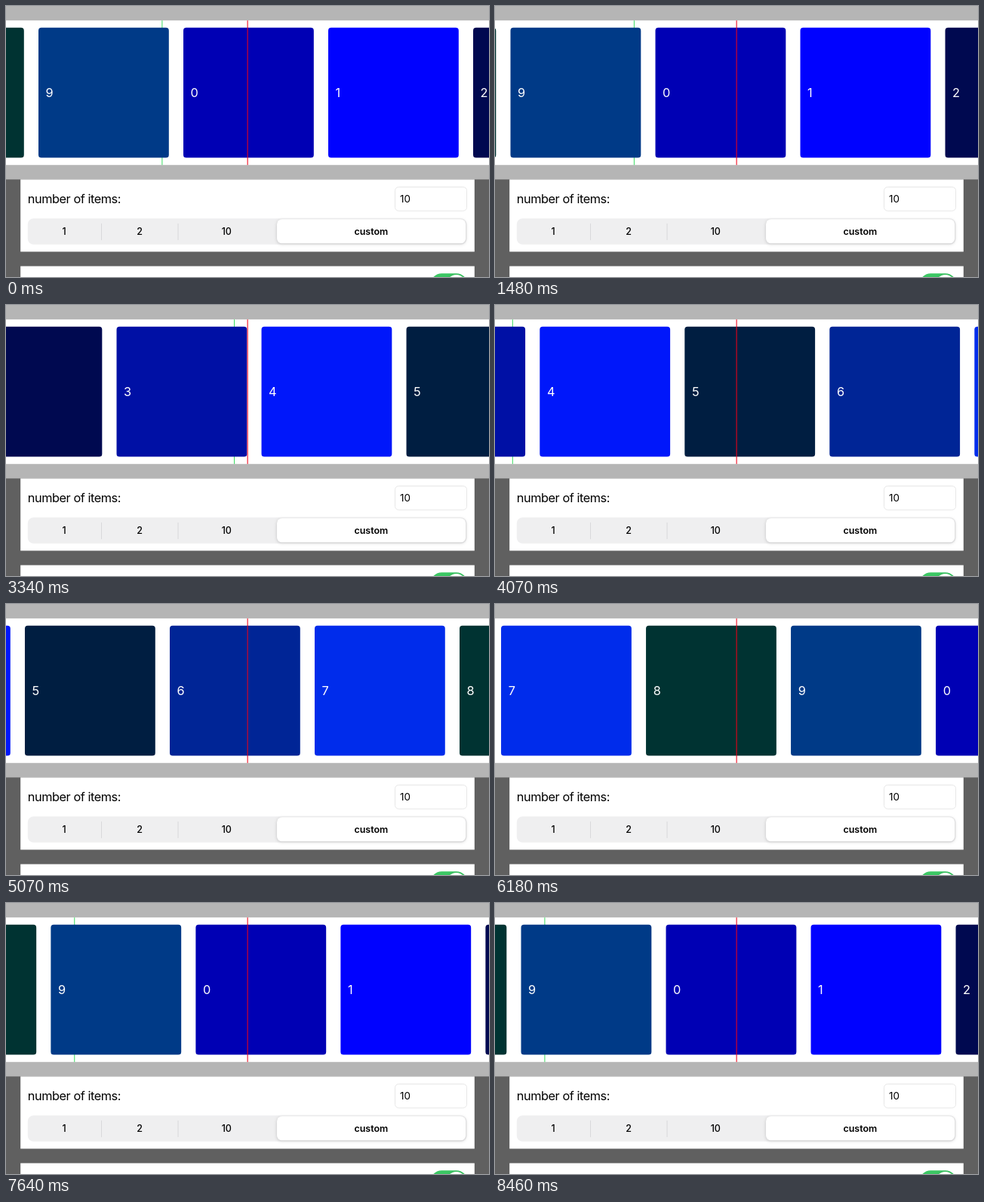
An HTML page that plays this animation: 640x360 px, repeating every 8770 ms.

```html
<!DOCTYPE html>
<html lang="en">
<head>
<meta charset="utf-8">
<title>Infinite carousel</title>
<style>
  html, body { margin: 0; width: 100%; height: 100%; overflow: hidden; background: #606060; }
  svg { display: block; width: 640px; height: 360px; font: 17px Inter, Roboto, sans-serif; }
  .label { fill: #fff; }
  .title { letter-spacing: -.47px; }
  .field { font-size: 14px; }
  .segment { font-size: 13px; font-weight: 500; text-anchor: middle; }
  .selected { font-weight: 600; }
  .raised { filter: drop-shadow(0 1px 2px rgba(0, 0, 0, .18)); }
</style>
</head>
<body>
<!-- Laid out in points of a 375 point high screen -->
<svg viewBox="0 0 666.667 375">
  <rect width="667" height="375" fill="#606060"/>
  <rect width="667" height="240" fill="#b5b5b5"/>
  <rect y="20" width="667" height="200" fill="#fff"/>
  <rect id="origin" y="20" width="1" height="200" fill="#34dc5c"/>
  <g id="items"></g>
  <rect x="332.9" y="20" width="1.1" height="200" fill="#f00018"/>

  <rect x="20" y="240" width="626.667" height="100" fill="#fff"/>
  <text class="title" x="30" y="273">number of items:</text>
  <rect x="537" y="250.5" width="99" height="33" rx="5" fill="#fff" stroke="#e6e6e6"/>
  <text class="field" x="543.7" y="272">10</text>

  <rect x="30" y="294" width="606" height="36" rx="8" fill="#efeff0"/>
  <path d="M131.8 301v23M237.5 301v23" stroke="#d8d8da"/>
  <rect class="raised" x="374" y="295" width="260.5" height="33.5" rx="7" fill="#fff"/>
  <text class="segment" x="80.2" y="317">1</text>
  <text class="segment" x="184.4" y="317">2</text>
  <text class="segment" x="304.5" y="317">10</text>
  <text class="segment selected" x="504" y="317">custom</text>

  <rect x="20" y="360" width="626.667" height="15" fill="#fff"/>
  <rect x="586" y="370" width="51" height="31" rx="15.5" fill="#3cc764"/>
  <circle class="raised" cx="621.5" cy="385.5" r="13.5" fill="#fff"/>
</svg>
<script>
const LOOP = 8770, COUNT = 10, PITCH = 200, SIZE = 180, START = 244.8, CENTER = 333;
const SPAN = PITCH * COUNT;

// Timing of a swipe in ms: the finger leads the first update, drags, lets go, then the list coasts
const LEAD = 100, DRAG = 220, COAST = 500, STEP = 104, PAUSE = 220;
const SWIPES = [
  { start: 1380, release: 75, rest: 75 },
  { start: 1770, release: 437.3, rest: 703.6 },
  { start: 3340, release: 742, rest: 1119.8 },
  { start: 4520, release: 1157.1, rest: 1293.8 },
  { start: 5640, release: 1457.7, rest: 1853.8 },
  { start: 7120, release: 1955.2, rest: 2016.7 },
];

// Offsets at which the scroll view recenters itself
const RECENTERS = [-118, 673.8, 1744];

function glide({ start, release, rest }, from, t) {
  const since = t - start;
  return since < DRAG
    ? from + (release - from) * (since + LEAD) / (DRAG + LEAD)
    : rest - (rest - release) * Math.exp((DRAG - since) / COAST);
}

// The screen refreshes in steps and pauses before each new touch
function offsetAt(t) {
  let offset = 0;
  SWIPES.forEach((swipe, i) => {
    if (t < swipe.start) return;
    const next = SWIPES[i + 1];
    const until = next ? Math.min(t, next.start - PAUSE) : t;
    const shown = until - (until - swipe.start) % STEP;
    offset = glide(swipe, offset, shown);
  });
  return offset;
}

// Blue cycles through three levels while green slowly rises
function colorOf(i) {
  const green = Math.max(0, 7 * i - 5);
  const blue = Math.min(255, 90 * ((i + 1) % 3 + 1) - 5 * i);
  return `rgb(0, ${green}, ${blue})`;
}

function svgNode(name, attrs, parent) {
  const node = document.createElementNS('http://www.w3.org/2000/svg', name);
  for (const key in attrs) node.setAttribute(key, attrs[key]);
  return parent.appendChild(node);
}

const origin = document.getElementById('origin');
const list = document.getElementById('items');
const items = Array.from({ length: COUNT }, (_, i) => {
  const g = svgNode('g', {}, list);
  svgNode('rect', { y: 30, width: SIZE, height: SIZE, rx: 4, fill: colorOf(i) }, g);
  svgNode('text', { class: 'label', x: 10, y: 126 }, g).textContent = i;
  return g;
});

function draw(t) {
  const offset = offsetAt(t);
  items.forEach((g, i) => {
    const x = START + PITCH * (i + 1) - offset;
    g.setAttribute('transform', `translate(${(x % SPAN + SPAN) % SPAN - PITCH})`);
  });
  const center = RECENTERS.filter(r => r <= offset).pop();
  origin.setAttribute('x', center + CENTER - offset);
}

const began = performance.now();
function tick() {
  draw((performance.now() - began) % LOOP);
  requestAnimationFrame(tick);
}
tick();
</script>
</body>
</html>
```
